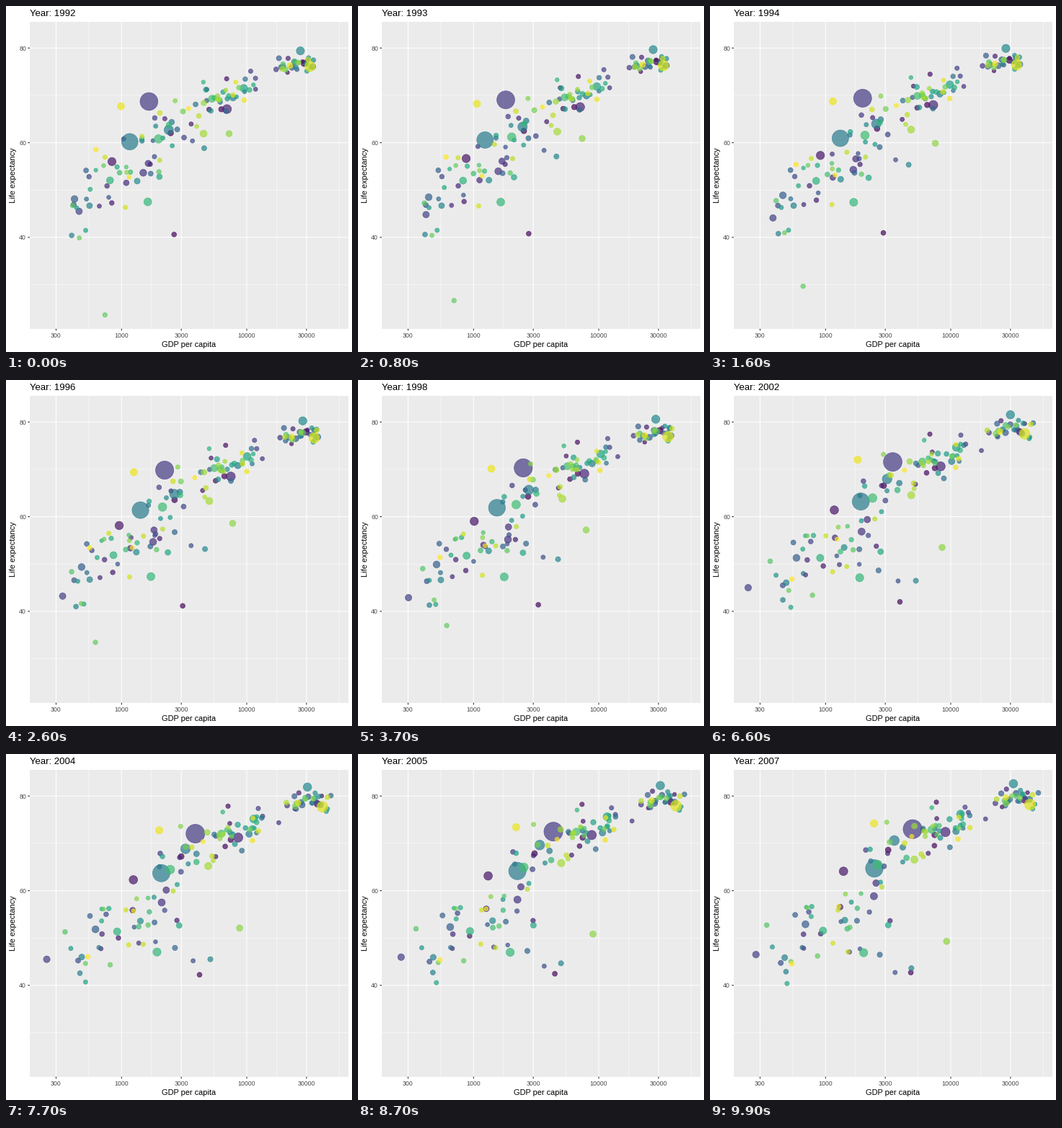
Animation of 480x480 px, one loop 10000 ms. Source, as a matplotlib script:

```python
import numpy as np
import matplotlib.pyplot as plt
from matplotlib.animation import FuncAnimation
from matplotlib.patches import Rectangle

FRAMES, INTERVAL = 100, 100
FIRST, LAST, STEP = 1992, 2007, 5
COUNT = 142
MAX_POP = 1319

# Colour rank, population (millions), then income and life expectancy
# in the first and the last year.
LEADERS = [
    (24, 1235, 1656, 68.7, 4959, 73.0),
    (58, 1010, 1164, 60.2, 2452, 64.7),
    (134, 282, 32004, 76.1, 42952, 78.2),
    (59, 205, 2383, 62.7, 3541, 70.6),
    (14, 174, 6950, 67.1, 9066, 72.4),
    (97, 145, 1972, 60.8, 2606, 65.5),
    (8, 130, 838, 56.0, 1391, 64.1),
    (94, 114, 1620, 47.5, 2014, 46.9),
    (66, 126, 26825, 79.4, 31656, 82.6),
    (82, 99, 9472, 71.5, 11978, 76.2),
    (137, 78, 989, 67.7, 2442, 74.2),
    (42, 64, 421, 48.1, 691, 52.9),
    (27, 52, 458, 45.5, 278, 46.5),
    (107, 7.5, 737, 23.6, 863, 46.2),
    (117, 42, 7225, 61.9, 9270, 49.3),
    (3, 10, 2628, 40.6, 4797, 42.7),
]

# Income and life expectancy in the two middle years, where the path bends.
BENDS = {107: (590, 36.1, 786, 43.4), 27: (312, 42.6, 241, 45.0)}

EVEN = np.linspace(0, 1, 4)
EARLY = 1 - (1 - EVEN) ** 1.6

rng = np.random.default_rng(12)
income = np.zeros((4, COUNT))  # log10
life = np.zeros((4, COUNT))
pop = np.zeros(COUNT)


def add_group(ids, span, level, slope, spread, growth, gain, pace=EVEN):
    """Scatter bubbles around a line and let them drift over the years."""
    n = len(ids)
    x = np.linspace(*span, n) + rng.normal(0, 0.03, n)
    y = level + slope * (x - np.mean(span))
    y += spread * np.clip(rng.normal(size=n), -2, 2)
    dx = rng.normal(*growth, n)
    dy = gain[0] + gain[1] * np.clip(rng.normal(size=n), -2, 2)
    income[:, ids] = x + np.outer(EVEN, dx)
    life[:, ids] = y + np.outer(pace, dy)
    income[1:3, ids] += rng.normal(0, 0.02, (2, n))
    life[1:3, ids] += rng.normal(0, 0.3, (2, n))
    pop[ids] = np.clip(rng.lognormal(2.2, 1.1, n), 0.5, 75)


for rank, people, g0, l0, g1, l1 in LEADERS:
    pop[rank] = people
    income[:, rank] = np.log10(g0) + EVEN * np.log10(g1 / g0)
    life[:, rank] = l0 + EVEN * (l1 - l0)
for rank, (ga, la, gb, lb) in BENDS.items():
    income[1:3, rank] = np.log10([ga, gb])
    life[1:3, rank] = la, lb

rest = rng.permutation(np.flatnonzero(pop == 0))
rich, upper, middle, low, falling = np.split(rest, [28, 55, 80, 119])
add_group(rich, (4.26, 4.53), 76.6, 4, 0.9, (0.13, 0.04), (3.0, 0.5))
add_group(upper, (3.68, 4.06), 70.6, 5, 2.0, (0.13, 0.08), (3.4, 0.9))
add_group(middle, (3.27, 3.82), 66.3, 11, 2.8, (0.13, 0.08), (4.4, 1.2))
add_group(low, (2.6, 3.33), 51.0, 13, 3.6, (0.07, 0.1), (2.6, 3.0))
add_group(falling, (2.86, 3.72), 60.0, 0, 1.4, (0.06, 0.08), (-15, 2.5), EARLY)


def px(log_income):
    return 160.3 + 173.7 * (log_income - 3)


def py(years):
    return 58.3 + 6.565 * (80 - years)


def diameter(people):
    size = 2 + 10 * np.sqrt(np.minimum(people / MAX_POP, 1))
    return 0.75 * (2.845 * size + 0.945)


plt.rcParams["font.family"] = "Liberation Sans"
fig = plt.figure(figsize=(480 / 72, 480 / 72), dpi=72, facecolor="white")
ax = fig.add_axes([0, 0, 1, 1])
ax.set(xlim=(0, 480), ylim=(480, 0))
ax.axis("off")

LEFT, RIGHT, TOP, BOTTOM = 33, 474.5, 22, 447.7
TICK, THICK, THIN = 2.75, 1.07, 0.53
panel = Rectangle((LEFT, TOP), RIGHT - LEFT, BOTTOM - TOP, fc="#EBEBEB", lw=0, zorder=0)
ax.add_patch(panel)


def rule_x(x, top, bottom, width, color="white"):
    ax.plot([x, x], [top, bottom], color=color, lw=width,
            solid_capstyle="butt", snap=False, zorder=1)


def rule_y(y, left, right, width, color="white"):
    ax.plot([left, right], [y, y], color=color, lw=width,
            solid_capstyle="butt", snap=False, zorder=1)


breaks = [300, 1000, 3000, 10000, 30000]
logs = np.log10(breaks)
ends = np.append(logs, logs[-1] + logs[1] - logs[0])
for v in (ends[:-1] + ends[1:]) / 2:
    rule_x(px(v), TOP, BOTTOM, THIN)
for v in (30, 50, 70):
    rule_y(py(v), LEFT, RIGHT, THIN)

label = dict(size=8.8, color="#4D4D4D", va="baseline")
for b, x in zip(breaks, px(logs)):
    rule_x(x, TOP, BOTTOM, THICK)
    rule_x(x, BOTTOM, BOTTOM + TICK, THICK, "#333333")
    ax.text(x, 460, str(b), ha="center", **label)
for v in (40, 60, 80):
    rule_y(py(v), LEFT, RIGHT, THICK)
    rule_y(py(v), LEFT - TICK, LEFT, THICK, "#333333")
    ax.text(28, py(v) + 3.2, str(v), ha="right", **label)

ax.text(254, 473, "GDP per capita", size=11, ha="center", va="baseline")
ax.text(13, 235, "Life expectancy", size=11, rotation=90,
        rotation_mode="anchor", ha="center", va="baseline")
title = ax.text(LEFT, 14, "", size=13.2, ha="left", va="baseline")

colors = plt.get_cmap("viridis")(np.linspace(0, 1, COUNT))
colors[:, 3] = 0.7
dots = ax.scatter(px(income[0]), py(life[0]), s=diameter(pop) ** 2,
                  facecolors=colors, edgecolors=colors, linewidths=0.7, zorder=2)
dots.set_clip_path(panel)


def update(i):
    year = FIRST + (LAST - FIRST) * i / (FRAMES - 1)
    pos = (year - FIRST) / STEP
    k = min(int(pos), 2)
    f = pos - k
    x = income[k] * (1 - f) + income[k + 1] * f
    y = life[k] * (1 - f) + life[k + 1] * f
    dots.set_offsets(np.column_stack([px(x), py(y)]))
    dots.set_sizes(diameter(pop * (1 + 0.011 * (year - 2000))) ** 2)
    title.set_text(f"Year: {round(year)}")
    return dots, title


anim = FuncAnimation(fig, update, frames=FRAMES, interval=INTERVAL, repeat=True)
plt.show()
```
